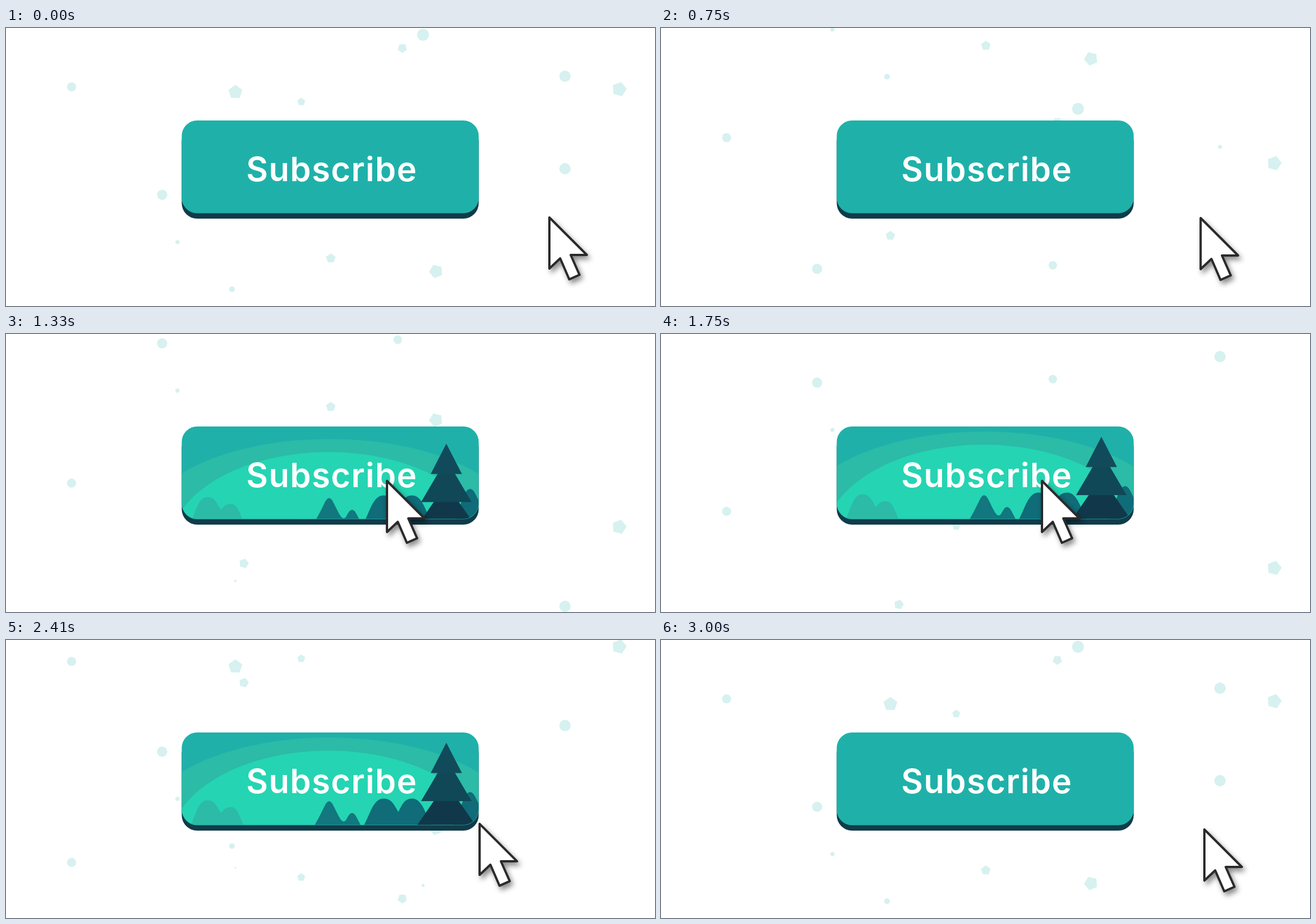
Recreate the animation shown at these times as an HTML page. Size 1143x490 px, loop 3040 ms.

```html
<!DOCTYPE html>
<html lang="en">
<head>
<meta charset="utf-8">
<title>Subscribe button</title>
<style>
  html, body { margin: 0; width: 100%; height: 100%; overflow: hidden; background: #fff; }
  svg { display: block; width: 100vw; height: 100vh; }
  #bits { fill: #d6f1f0; }
  #label { font: 600 59px Inter, "Open Sans", sans-serif; letter-spacing: 1.4px; fill: #fff; text-anchor: middle; }
  #cursor path { fill: #fff; stroke: #2a2a2c; stroke-width: 4; stroke-linejoin: round; }
  #cursor { filter: drop-shadow(4px 6px 5px rgba(0, 0, 0, .45)); }
</style>
</head>
<body>
<svg viewBox="0 0 1143 490">
  <defs>
    <clipPath id="face"><rect x="310" y="163.5" width="522" height="162.2" rx="26.5"/></clipPath>
  </defs>
  <g id="bits"></g>
  <rect x="309.500" y="173" width="523" height="163" rx="27" fill="#103c4a"/>
  <rect x="309.500" y="163" width="523" height="163.5" rx="27" fill="#1fb1a9"/>
  <g clip-path="url(#face)">
    <g class="rise" data-drop="160">
      <ellipse cx="570" cy="329" rx="330" ry="157" fill="#2bbba7"/>
      <ellipse cx="568" cy="363" rx="281" ry="168" fill="#25d4b2"/>
    </g>
    <g class="rise" data-drop="60">
      <path fill="#2bbba7" d="M325 327C335 308 338 282.500 355 282.500C369 282.500 372 296 379 305C384 298 387 294.500 396 294.500C408 294.500 411 311 419 327Z"/>
      <path fill="#12777f" d="M543 327C551 314 558 299 563 289Q569 279.500 575 289C580 298 585 310 590 317Q595 323 599 317C603 310 605 305 609.500 305C615 305 618 314 625 327Z"/>
      <path fill="#0f6c78" d="M630 327C641 309 646 279.500 665 279.500C680 279.500 684 292 691 303C697 292 701 279.500 715 279.500C734 279.500 739 309 750 327Z"/>
      <path fill="#0f6c78" d="M788 327C799 309 805 268 817.500 268C824 268 828 280 834 292L850 327Z"/>
    </g>
    <g class="rise" data-drop="150">
      <path fill="#11384a" d="M754 283H797L828 328H723Z"/>
      <path fill="#104858" d="M761 233H790L820 284H731Z"/>
      <path fill="#114b5b" d="M775.500 181L803 234.500H748Z"/>
    </g>
  </g>
  <text id="label" x="573.7" y="270">Subscribe</text>
  <g id="cursor"><path d="M0 0V90L19 72L35 109L53 101L37.500 66H66Z"/></g>
</svg>
<script>
const LOOP = 3040, FPS = 24, LAST = 72;
const FAST = 7.25, SLOW = 4.97, ENTER = 6.94, ENTER_SLOW = 4.72;

// x, y at the loop seam, radius, fall speed before and after the seam,
// rotation (pentagons only), step at which it has shrunk away, shrink duration
const bits = [
  { x: 115.5, y: 103.8, r: 8, a: ENTER_SLOW, b: SLOW, gone: 72, fade: 13 },
  { x: 404, y: 113, r: 12.8, a: ENTER_SLOW, b: SLOW, rot: 0, gone: 62, fade: 29 },
  { x: 404, y: 277.3, r: 12.8, b: 4.93, rot: 0, gone: 37.5, fade: 29 },
  { x: 520, y: 130, r: 7.3, a: ENTER, b: SLOW, rot: 0, gone: 72, fade: 13 },
  { x: 698, y: 35.5, r: 8.5, a: ENTER, b: FAST, rot: 180 },
  { x: 734.5, y: 12, r: 10.5, a: ENTER, b: FAST, gone: 65, fade: 28 },
  { x: 984.5, y: 85, r: 10, a: ENTER, b: 6.92, gone: 28, fade: 28 },
  { x: 984.5, y: 248, r: 10, a: ENTER, b: FAST },
  { x: 1080, y: 108, r: 13.2, a: 6.88, b: FAST, rot: 15 },
  { x: 275, y: 294, r: 9, a: ENTER, b: FAST },
  { x: 302, y: 377.3, r: 4.3, a: ENTER, b: FAST, rot: 0 },
  { x: 398, y: 460.4, r: 5, a: ENTER, b: FAST },
  { x: 572, y: 406, r: 8.8, a: ENTER, b: FAST, rot: 0 },
  { x: 757.3, y: 429, r: 12.4, a: ENTER, b: FAST, rot: -23 },
  { x: 690, y: 287.7, r: 7.5, a: ENTER, b: FAST },
  { x: 419, y: 172.4, r: 8.8, a: ENTER, b: FAST, rot: 15 }
];

const NS = "http://www.w3.org/2000/svg";
const layer = document.getElementById("bits");
const cursor = document.getElementById("cursor");
const risers = [...document.querySelectorAll(".rise")];

function pentagon(rot) {
  return Array.from({ length: 5 }, (_, i) => {
    const q = (rot - 90 + i * 72) * Math.PI / 180;
    return Math.cos(q).toFixed(4) + "," + Math.sin(q).toFixed(4);
  }).join(" ");
}

function addShape(bit) {
  const round = bit.rot === undefined;
  const el = document.createElementNS(NS, round ? "circle" : "polygon");
  if (round) el.setAttribute("r", 1);
  else el.setAttribute("points", pentagon(bit.rot));
  return layer.appendChild(el);
}

// Each bit shows twice: entering before the seam and leaving after it.
for (const bit of bits) {
  bit.enter = bit.a ? addShape(bit) : null;
  bit.leave = addShape(bit);
}

const clamp = v => Math.max(0, Math.min(1, v));
const ease = u => u * u * (3 - 2 * u);
const ramp = (k, from, to) => ease(clamp((k - from) / (to - from)));
const place = (el, x, y, s) =>
  el.setAttribute("transform", `translate(${x} ${y}) scale(${s})`);

function bezier(s, p0, p1, p2, p3) {
  const q = 1 - s;
  return q * q * q * p0 + 3 * q * q * s * p1 + 3 * q * s * s * p2 + s * s * s * p3;
}

function draw(k) {
  const step = k % LAST;
  for (const bit of bits) {
    if (bit.enter) place(bit.enter, bit.x, bit.y - bit.a * (LAST - step), step ? bit.r : 0);
    const size = bit.gone ? clamp((bit.gone - step) / bit.fade) : 1;
    place(bit.leave, bit.x, bit.y + bit.b * step, bit.r * size);
  }

  const s = ramp(k, 16.8, 28) - ramp(k, 52.2, 63.4);
  place(cursor, bezier(s, 957, 890, 770, 671), bezier(s, 334, 346, 315, 259), 1);

  const up = ramp(k, 24, 33.7) - ramp(k, 58.5, 68.5);
  for (const el of risers) place(el, 0, el.dataset.drop * (1 - up), 1);
}

function tick() {
  const t = performance.now() % LOOP;
  draw(Math.min(LAST, Math.floor((t + 8) * FPS / 1000)));
  requestAnimationFrame(tick);
}
tick();
</script>
</body>
</html>
```
